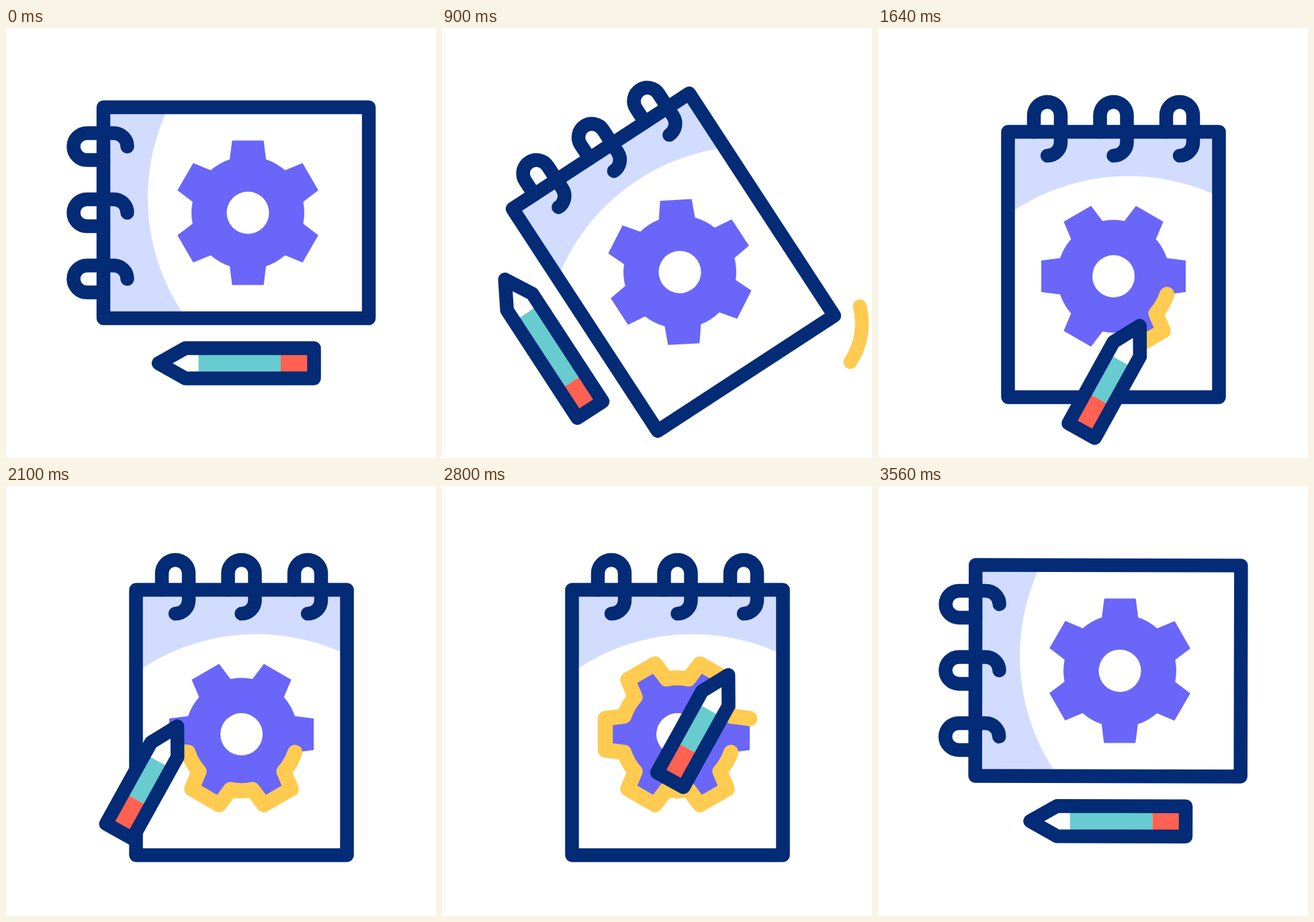
An HTML page with a canvas that plays this animation: 640 by 640 pixels, repeating every 3580 ms.

```html
<!DOCTYPE html>
<html lang="en">
<head>
<meta charset="utf-8">
<title>Sketchbook</title>
<style>
  html, body { margin: 0; width: 100%; height: 100%; overflow: hidden; background: #fff; }
  canvas { display: block; width: 640px; height: 640px; }
</style>
</head>
<body>
<canvas id="stage" width="640" height="640"></canvas>
<script>
const ctx = document.getElementById('stage').getContext('2d');
const LOOP = 3580;
const LINE = 20.5;
const NAVY = '#032b76', PURPLE = '#6966f9', LAVENDER = '#d2dcfe';
const TEAL = '#68cbd0', RED = '#ff6152', YELLOW = '#ffcb50', WHITE = '#fff';

// Gear centre with the book lying flat and standing upright.
const FLAT = { x: 360, y: 275 }, UPRIGHT = { x: 350.5, y: 369.5 };
const LIFTED_Y = 246;

// Pencil tip while tracing, in upright page coordinates: [time, x, y].
const PENCIL_REST = [126.5, 236.5];
const TRACE = [
  [1470, 430, 364], [1555, 424, 405], [1640, 390, 443], [1735, 352, 432],
  [1840, 312, 443], [1960, 275, 412], [2100, 255, 358], [2230, 262, 315],
  [2380, 292, 282], [2580, 350, 272], [2690, 388, 264], [2800, 426, 281],
  [2900, 429, 313], [3000, 430, 364]
];

const rad = deg => deg * Math.PI / 180;
const mix = (a, b, k) => a + (b - a) * k;
const ramp = (t, from, to) => Math.min(1, Math.max(0, (t - from) / (to - from)));
const ease = (t, from, to) => {
  const u = ramp(t, from, to);
  return u * u * (3 - 2 * u);
};

// Gear outline: six teeth joined by arcs, starting at the right foot of the top tooth.
const ROOT = { x: 27, y: 79.5 }, CREST = { x: 23.5, y: 107.5 };
const ROOT_R = Math.hypot(ROOT.x, ROOT.y);
const ROOT_ANGLE = Math.atan2(ROOT.x, ROOT.y);
const VALLEY = Math.PI / 3 - 2 * ROOT_ANGLE;
const GEAR_LENGTH = 6 * (VALLEY * ROOT_R + 2 * CREST.x +
  2 * Math.hypot(ROOT.x - CREST.x, CREST.y - ROOT.y));

function makeGear() {
  const path = new Path2D();
  for (let i = 1; i <= 6; i++) {
    const turn = i * Math.PI / 3;
    const c = Math.cos(turn), s = Math.sin(turn);
    const point = (x, y) => path.lineTo(x * c - y * s, x * s + y * c);
    const end = turn - Math.PI / 2 - ROOT_ANGLE;
    path.arc(0, 0, ROOT_R, end - VALLEY, end);
    point(-CREST.x, -CREST.y);
    point(CREST.x, -CREST.y);
    point(ROOT.x, -ROOT.y);
  }
  return path;
}
const gear = makeGear();

function stroke(color, width, path) {
  ctx.strokeStyle = color;
  ctx.lineWidth = width;
  path ? ctx.stroke(path) : ctx.stroke();
}

function disc(x, y, r, color) {
  ctx.fillStyle = color;
  ctx.beginPath();
  ctx.arc(x, y, r, 0, 2 * Math.PI);
  ctx.fill();
}

function drawRing(y) {
  ctx.beginPath();
  ctx.arc(-199.5, y, 20, 0, -Math.PI / 2, true);
  ctx.arc(-239.5, y, 20, -Math.PI / 2, Math.PI / 2, true);
  ctx.lineTo(-215, y + 20);
  stroke(NAVY, LINE);
}

function drawBook(t) {
  ctx.save();
  ctx.beginPath();
  ctx.rect(-215, -157, 395, 314);
  ctx.clip();
  ctx.fillStyle = LAVENDER;
  ctx.fillRect(-215, -157, 200, 314);
  disc(161, -22.5, 310, WHITE);
  ctx.restore();

  ctx.fillStyle = PURPLE;
  ctx.fill(gear);
  disc(0, 0, 31.5, WHITE);

  ctx.beginPath();
  ctx.rect(-215, -157, 395, 314);
  stroke(NAVY, LINE);
  [-98.5, 0, 98.5].forEach(drawRing);

  const head = ramp(t, 1445, 2938), tail = ease(t, 3025, 3490);
  if (head > tail) {
    ctx.save();
    ctx.setLineDash([(head - tail) * GEAR_LENGTH, 2 * GEAR_LENGTH]);
    ctx.lineDashOffset = -tail * GEAR_LENGTH;
    stroke(YELLOW, 22.5, gear);
    ctx.restore();
  }
}

// Smooth curve through the trace points.
function tracePoint(t) {
  const last = TRACE.length - 1;
  if (t <= TRACE[0][0]) return TRACE[0].slice(1);
  if (t >= TRACE[last][0]) return TRACE[last].slice(1);
  const i = TRACE.findIndex(p => p[0] > t) - 1;
  const a = TRACE[Math.max(0, i - 1)], b = TRACE[i];
  const c = TRACE[i + 1], d = TRACE[Math.min(last, i + 2)];
  const span = c[0] - b[0], u = (t - b[0]) / span;
  return [1, 2].map(n => {
    const m0 = (c[n] - a[n]) / (c[0] - a[0]) * span;
    const m1 = (d[n] - b[n]) / (d[0] - b[0]) * span;
    const blend = u * u * (3 - 2 * u);
    return mix(b[n], c[n], blend) + u * (1 - u) * ((1 - u) * m0 - u * m1);
  });
}

function drawPencil(t) {
  const away = ease(t, 1060, 1470) - ease(t, 3035, 3560);
  const tilt = ease(t, 1040, 1450) - ease(t, 3035, 3560);
  const worn = ease(t, 1040, 1450) - ease(t, 3110, 3560);
  const length = 231.5 - 53 * worn;
  const band = length - 49.5 - 4 * worn * worn;
  const [x, y] = tracePoint(t);

  ctx.save();
  ctx.rotate(-Math.PI / 2);
  ctx.translate(mix(PENCIL_REST[0], x, away) - UPRIGHT.x,
                mix(PENCIL_REST[1], y, away) - UPRIGHT.y);
  ctx.rotate(rad(90 + 29 * tilt));

  ctx.beginPath();
  ctx.moveTo(0, 0);
  ctx.lineTo(40, -22.5);
  ctx.lineTo(length, -22.5);
  ctx.lineTo(length, 22.5);
  ctx.lineTo(40, 22.5);
  ctx.closePath();
  ctx.fillStyle = WHITE;
  ctx.fill();
  ctx.fillStyle = TEAL;
  ctx.fillRect(59.5, -22, band - 59.5, 44);
  ctx.fillStyle = RED;
  ctx.fillRect(band, -22, length - band, 44);
  stroke(NAVY, LINE);
  ctx.restore();
}

// side is 1 for the clockwise sweep and -1 for its mirror image.
function drawSwoosh(x, y, side, head, tail) {
  if (head <= tail) return;
  const angle = k => side * rad(mix(-14.5, 122.6, k));
  ctx.beginPath();
  ctx.arc(x, y, 103, angle(tail), angle(head), side < 0);
  stroke(YELLOW, LINE);
}

function draw(t) {
  ctx.fillStyle = WHITE;
  ctx.fillRect(0, 0, 640, 640);
  ctx.lineCap = ctx.lineJoin = 'round';

  const turn = ease(t, 576, 1128) - ease(t, 2882, 3576);
  const lift = mix(FLAT.y, LIFTED_Y, ease(t, 205, 642));
  const drop = mix(lift, UPRIGHT.y, ease(t, 642, 942));

  ctx.save();
  ctx.translate(mix(FLAT.x, UPRIGHT.x, turn), mix(drop, FLAT.y, ease(t, 2885, 3525)));
  ctx.rotate(turn * Math.PI / 2);
  drawBook(t);
  drawPencil(t);
  ctx.restore();

  drawSwoosh(522, 440, 1, ease(t, 755, 1120), ease(t, 990, 1255));
  drawSwoosh(512.5, 149, -1, 1 - (1 - ramp(t, 2830, 3200)) ** 1.3, ease(t, 3135, 3400));
}

function tick() {
  draw(performance.now() % LOOP);
  requestAnimationFrame(tick);
}
tick();
</script>
</body>
</html>
```
